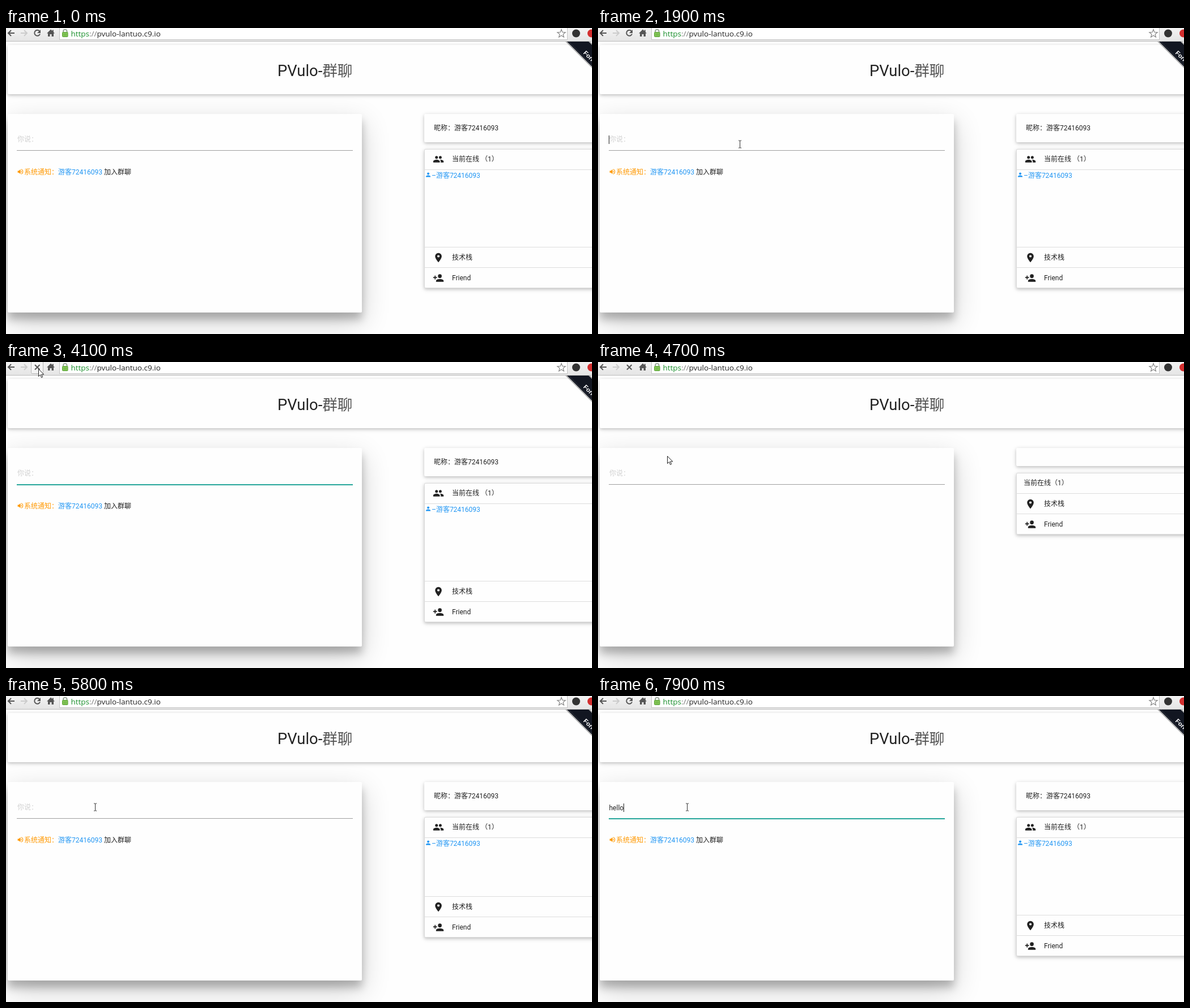
Animation, 1034 px wide and 541 px high, one loop 8 s. Source, as an HTML page:

```html
<!DOCTYPE html>
<html lang="zh-CN">
<head>
<meta charset="utf-8">
<title>群聊</title>
<style>
html, body { margin: 0; width: 100%; height: 100%; overflow: hidden; background: #fefefe; }
#stage { position: relative; width: 1034px; height: 541px; overflow: hidden; }
.card {
  position: absolute; box-sizing: border-box; background: #fefefe; border-radius: 2px;
  box-shadow: 0 2px 5px rgba(0,0,0,.16), 0 2px 10px rgba(0,0,0,.12);
}
#title { left: 3px; top: 30px; width: 1060px; height: 87px; }
#chat {
  left: 3px; top: 152px; width: 625px; height: 351px;
  box-shadow: 0 12px 15px rgba(0,0,0,.24), 0 17px 50px rgba(0,0,0,.19);
}
#nick { left: 738px; top: 152px; width: 320px; }
#panel { left: 738px; width: 320px; border: 1px solid #ddd; }
svg { position: absolute; left: 0; top: 0; fill: #222; }
text { font: 12px Roboto, "Noto Sans CJK SC", "Noto Sans CJK", sans-serif; fill: #222; white-space: pre; }
.head { font-size: 27.36px; }
.head .cjk { font-size: 26.6px; font-weight: 100; fill: #555; }
.url { font: 13.5px "Open Sans", "Noto Sans", sans-serif; }
.blue { fill: #2196f3; }
.orange { fill: #ff9800; }
.rule { fill: #ddd; }
.tool { fill: none; stroke: #555; stroke-width: 2; }
</style>
</head>
<body>
<div id="stage">
  <div class="card" id="chat"></div>
  <div class="card" id="title"></div>
  <div class="card" id="nick"></div>
  <div class="card" id="panel"></div>

  <svg width="1034" height="541" viewBox="0 0 1034 541">
    <defs>
      <linearGradient id="bar" x2="0" y2="1">
        <stop stop-color="#f3f3f3"/><stop offset="1" stop-color="#e4e4e4"/>
      </linearGradient>
      <symbol id="person" viewBox="0 0 24 24">
        <circle cx="12" cy="8" r="4"/>
        <path d="M12 14c-2.7 0-8 1.3-8 4v2h16v-2c0-2.7-5.3-4-8-4z"/>
      </symbol>
      <symbol id="people" viewBox="0 0 24 24">
        <circle cx="8" cy="8" r="3"/><circle cx="16" cy="8" r="3"/>
        <path d="M8 13c-2.3 0-7 1.2-7 3.5V19h14v-2.5c0-2.3-4.7-3.5-7-3.5z"/>
        <path d="M15 13c1.2.9 2 2 2 3.5V19h6v-2.5c0-2.5-5.2-3.7-8-3.5z"/>
      </symbol>
      <symbol id="pin" viewBox="0 0 24 24">
        <path fill-rule="evenodd" d="M12 2a7 7 0 0 0-7 7c0 5.2 7 13 7 13s7-7.8 7-13a7 7 0 0 0-7-7zm0 4.5a2.5 2.5 0 0 1 0 5a2.5 2.5 0 0 1 0-5z"/>
      </symbol>
      <symbol id="add" viewBox="0 0 24 24">
        <use href="#person" x="3" width="24" height="24"/>
        <path d="M4 7h2v3h3v2H6v3H4v-3H1v-2h3z"/>
      </symbol>
      <symbol id="sound" viewBox="0 0 24 24">
        <path d="M3 9v6h4l5 5V4L7 9zM14 8a4.5 4.5 0 0 1 0 8z"/>
        <path d="M14 4.3a8 8 0 0 1 0 15.4" fill="none" stroke="#ff9800" stroke-width="2"/>
      </symbol>
    </defs>

    <!-- browser bar -->
    <rect width="1034" height="24" fill="url(#bar)"/>
    <rect y="23" width="1034" height="1" fill="#bdbdbd"/>
    <rect x="94.5" y="-3" width="896" height="23.5" fill="#fff" stroke="#c4c4c4"/>
    <path class="tool" d="M15 9H4M9 4L4 9l5 5"/>
    <path class="tool" style="stroke:#ccc" d="M26 9h11M32 4l5 5-5 5"/>
    <rect id="button" x="44.5" y="-2.5" width="21" height="23" rx="2" stroke="#b5b5b5"/>
    <g id="reload">
      <path class="tool" d="M59 5.5A5 5 0 1 0 60 10.5"/>
      <path d="M61 3v6h-6z" fill="#555"/>
    </g>
    <path id="stop" class="tool" d="M51 5l8.5 8.5M59.5 5L51 13.5"/>
    <path d="M79 2.5L72 9.5h2V15h3.5v-4h3v4H84V9.5h2l-2.2-2.2V3.5h-2v1.8z" fill="#555"/>
    <path d="M101 8V6a3.3 3.3 0 0 1 6.6 0v2" fill="none" stroke="#8a9a8a" stroke-width="1.6"/>
    <rect x="99.5" y="7.5" width="9.5" height="8" rx="1" fill="#8ccb5e" stroke="#4c9a2a"/>
    <path d="M101 10.5h6.5M101 13h6.5" stroke="#5fa83a"/>
    <text class="url" x="114.5" y="14.5"><tspan fill="#1a8f2c">https</tspan><tspan fill="#777">://</tspan>pvulo-lantuo.c9.io</text>
    <path id="star" fill="#fff" stroke="#8a8a8a" stroke-width="1.2"/>
    <circle cx="1006" cy="9.5" r="7" fill="#333"/>
    <circle cx="1033" cy="9.5" r="7" fill="#d32f2f"/>

    <text class="head" x="479" y="84.5">PVulo-<tspan class="cjk">群聊</tspan></text>

    <g id="ribbon">
      <path d="M987 24h44l3 3v44z" fill="#000" opacity=".3"/>
      <path d="M990 24h38l6 6v38z" fill="#121621"/>
      <path d="M993 24l41 41" stroke="#565b68" stroke-dasharray="2 1.5" stroke-width=".7"/>
      <text transform="translate(1018 44.7) rotate(45)" style="font:bold 11px 'Liberation Sans',sans-serif;fill:#fff">Fork</text>
    </g>

    <!-- chat -->
    <text id="hint" x="20" y="201" style="fill:#d1d1d1">你说：</text>
    <text id="typed" x="19.5" y="201.5"></text>
    <rect x="19" y="216" width="593" height="1" fill="#9e9e9e"/>
    <rect id="focus" x="19" y="216" width="593" height="2" fill="#26a69a"/>
    <rect id="caret" y="190" width="1" height="15"/>
    <g id="notice">
      <use class="orange" href="#sound" x="19" y="247.5" width="13" height="13"/>
      <text x="32" y="258.5"><tspan class="orange">系统通知：</tspan><tspan class="blue">游客72416093</tspan> 加入群聊</text>
    </g>

    <!-- side -->
    <text id="name" x="755" y="180.5">昵称：游客72416093</text>
    <g id="header">
      <use id="crowd" href="#people" x="753" y="8" width="20" height="20"/>
      <text id="count" y="22"></text>
      <rect class="rule" x="739" y="36" width="295" height="1"/>
    </g>
    <g id="member" class="blue">
      <use href="#person" x="739" y="253.5" width="12" height="12"/>
      <text class="blue" x="751" y="264.5">–游客72416093</text>
    </g>
    <g id="rows">
      <rect class="rule" x="739" width="295" height="1"/>
      <use href="#pin" x="753" y="9" width="20" height="20"/>
      <text x="787" y="22.5">技术栈</text>
      <rect class="rule" x="739" y="36" width="295" height="1"/>
      <use href="#add" x="753" y="45" width="20" height="20"/>
      <text x="787" y="59">Friend</text>
    </g>

    <path id="arrow" d="M.5.5v13l3-3 2 5 2.2-1-2.2-4.5h4.3z" fill="#fff" stroke="#222"/>
    <path id="beam" d="M-2.5-6.5h2l.5.5l.5-.5h2M0-6V6M-2.5 6.5h2l.5-.5l.5.5h2" fill="none" stroke="#333"/>
  </svg>
</div>
<script>
const LOOP = 8000, STEP = 100;
const el = {};
document.querySelectorAll('[id]').forEach(n => el[n.id] = n);

// pointer strokes: start time, then one point per step
const strokes = [
  [100, '1020,38 880,105 715,172 545,229 422,250 325,269 304,247 288,239 289,217'],
  [1100, '272,211 258,207 250,207'],
  [1600, '250,206'],
  [2600, '167,118 138,62 125,50 99,39 76,29 66,20 60,12 56,8'],
  [4100, '57,12 65,25 73,32 80,47 93,89 110,140 122,166 131,177 140,184 146,186 152,192 156,196 157,197']
].map(([start, pts]) => ({ start, pts: pts.split(' ').map(p => p.split(',').map(Number)) }));

const keys = [[6900, 'h'], [7200, 'e'], [7400, 'l'], [7500, 'l'], [7900, 'o']];

const within = (t, ...spans) => spans.some(([a, b]) => t >= a && t < b);
const clamp = v => Math.min(1, Math.max(0, v));
const show = (node, on) => node.style.display = on ? '' : 'none';
const move = (node, x, y) => node.setAttribute('transform', `translate(${x} ${y})`);

function pointerAt(t) {
  const s = strokes.filter(s => s.start <= t).pop();
  return s && s.pts[Math.min(s.pts.length - 1, Math.floor((t - s.start) / STEP))];
}

function drawPointer(t) {
  const p = pointerAt(t);
  const overInput = p && p[0] < 612 && p[1] > 186 && p[1] < 216;
  show(el.arrow, p && !overInput);
  show(el.beam, overInput);
  if (p) {
    move(el.arrow, ...p);
    move(el.beam, p[0] + .5, p[1] - .5);
  }
}

function drawInput(t) {
  const text = keys.filter(k => k[0] <= t).map(k => k[1]).join('');
  el.typed.textContent = text;
  show(el.hint, !text);
  el.caret.setAttribute('x', Math.round(19 + (text ? el.typed.getComputedTextLength() : 0)));
  show(el.caret, within(t, [1900, 2400], [2900, 3400], [6200, 6600], [6900, LOOP]));
  el.focus.style.opacity = t < 4500 ? clamp((t - 1900) / 300) : clamp((t - 6100) / 300);
}

function drawPage(t) {
  const bare = within(t, [4500, 4900]);
  const joined = !within(t, [4500, 5200]);
  const loaded = !within(t, [4500, 5700]);
  const top = bare ? 196 : 214;
  const open = t < 4500 ? 1 : 1 - (1 - clamp((t - 5696) / 350)) ** 4;
  const body = Math.round(137 * open);

  el.nick.style.height = (bare ? 32 : 50) + 'px';
  el.panel.style.top = top + 'px';
  el.panel.style.height = 109 + body + 'px';
  move(el.header, 0, top);
  move(el.rows, 0, top + 36 + body);
  el.count.textContent = joined ? '当前在线 （1）' : '当前在线（1）';
  el.count.setAttribute('x', joined ? 787 : 751);
  show(el.crowd, joined);
  show(el.notice, joined);
  show(el.name, !bare);
  show(el.member, body > 15);
  show(el.ribbon, loaded);

  const stopping = within(t, [3700, 5700]);
  show(el.stop, stopping);
  show(el.reload, !stopping);
  show(el.button, within(t, [3300, 4200]));
  el.button.setAttribute('fill', within(t, [3600, 3700]) ? '#d2d2d2' : '#f4f4f4');
}

const corners = Array.from({ length: 10 }, (_, i) => {
  const a = i * Math.PI / 5, r = i % 2 ? 3.2 : 7.5;
  return [980 + r * Math.sin(a), 10 - r * Math.cos(a)];
});
el.star.setAttribute('d', 'M' + corners.join('L') + 'z');

function frame() {
  const t = Math.floor(performance.now() % LOOP / STEP) * STEP;
  drawPage(t);
  drawInput(t);
  drawPointer(t);
  requestAnimationFrame(frame);
}
frame();
</script>
</body>
</html>
```
